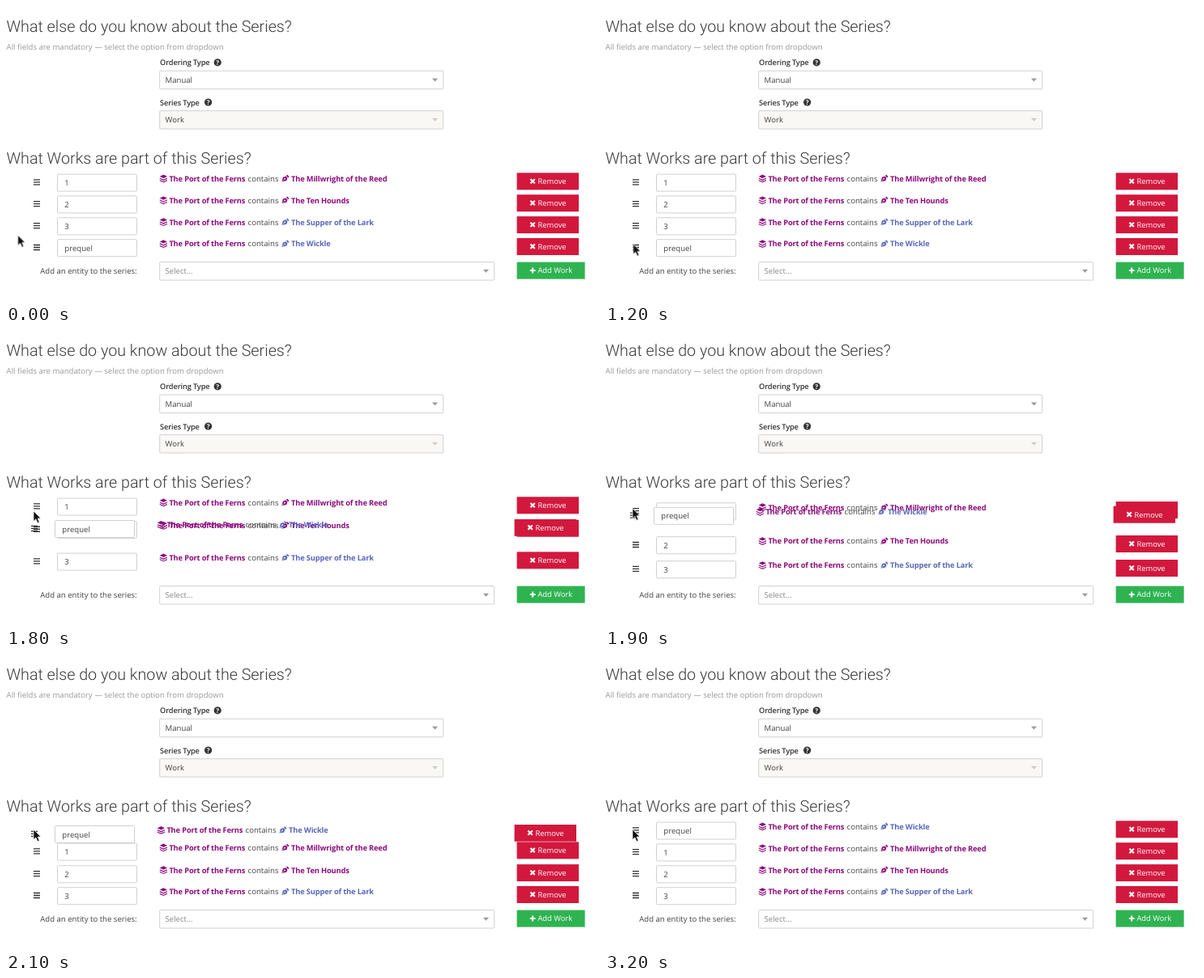
An HTML page for the animation above (3.5 s loop, 732 by 366 pixels).

```html
<!DOCTYPE html>
<html lang="en">
<head>
<meta charset="utf-8">
<title>Series editor</title>
<style>
html, body { margin: 0; width: 100%; height: 100%; overflow: hidden; background: #fff; }
svg { display: block; width: 732px; height: 366px; }
text { font: 9.6px "Open Sans", "Noto Sans", sans-serif; fill: #444; text-rendering: geometricPrecision; white-space: pre; }
.head { font: 300 19.72px Roboto, sans-serif; fill: #3a3a3a; }
.bold { font-weight: 700; font-size: 9.3px; letter-spacing: -.15px; }
.label { font-weight: 600; font-size: 9.3px; letter-spacing: -.16px; fill: #333; }
.btn { fill: #fff; font-size: 9.4px; }
.mark { fill: #fff; font-size: 8px; font-weight: 700; text-anchor: middle; }
</style>
</head>
<body>
<svg id="stage" viewBox="0 0 732 366"></svg>
<script>
const STEP = 100, LOOP = 3500, PITCH = 26.9;
const PURPLE = '#8d0a7c', BLUE = '#5a68b8', RED = '#d2183d', GREEN = '#2fb351';
const SERIES = 'The Port of the Ferns';
const stage = document.getElementById('stage');

function add(parent, tag, attrs, content) {
  const el = document.createElementNS('http://www.w3.org/2000/svg', tag);
  for (const k in attrs) el.setAttribute(k, attrs[k]);
  if (content) el.textContent = content;
  return parent.appendChild(el);
}
const text = (p, x, y, s, cls = '', fill) =>
  add(p, 'text', { x, y, class: cls, ...(fill && { style: 'fill:' + fill }) }, s);
const path = (p, x, y, d, attrs) =>
  add(p, 'path', { d, transform: `translate(${x} ${y})`, ...attrs });
const box = (p, x, y, width, height, fill = '#fff') =>
  add(p, 'rect', { x, y, width, height, fill, stroke: '#d0d0d0', rx: 1 });

function select(x, y, w, value, color, fill, caret) {
  box(stage, x, y, w, 22.4, fill);
  text(stage, x + 6.8, y + 14.3, value, '', color);
  path(stage, x + w - 13.7, y + 9.2, 'M0 0H7L3.5 4Z', { fill: caret });
}

function label(x, y, s, iconX) {
  text(stage, x, y, s, 'label');
  add(stage, 'circle', { cx: iconX, cy: y - 3.6, r: 4.6, fill: '#333' });
  text(stage, iconX, y - .6, '?', 'mark');
}

function button(p, x, y, w, fill, icon, s) {
  add(p, 'rect', { x, y, width: w, height: 21, fill });
  path(p, x + 16.2, y + 7, icon, { stroke: '#fff', 'stroke-width': 2.1, fill: 'none' });
  text(p, x + 25.8, y + 13.8, s, 'btn');
}

function layers(p, x, y) {
  path(p, x, y, 'M0 2.4 4.6 .2 9.2 2.4 4.6 4.6ZM0 4.1 4.6 6.2 9.2 4.1V5.4L4.6 7.6 0 5.4ZM0 6.7 4.6 8.8 9.2 6.7V7.9L4.6 10 0 7.9Z', { fill: PURPLE });
}

function pen(p, x, y, fill) {
  path(p, x, y, 'M0 9 1.5 3.5 5 2.3 7.1 4.4 5.9 7.7ZM5.6 1.7 6.8 .4 9.2 2.8 7.8 4Z', { fill });
  path(p, x, y, 'M.6 8.4 3.3 5.8', { stroke: '#fff', 'stroke-width': .6 });
  add(p, 'circle', { cx: x + 3.7, cy: y + 5.4, r: .9, fill: '#fff' });
}

// A row is drawn in the first slot and moved into place.
function makeRow(order, title, color) {
  const g = add(stage, 'g', {});
  path(g, 34, 217.8, 'M0-3H8M0 0H8M0 3H8', { stroke: '#333', 'stroke-width': 1.3 });
  box(g, 63.5, 208, 98, 21);
  text(g, 72.3, 222, order);
  layers(g, 189.8, 208.3);
  text(g, 201.4, 216.8, SERIES, 'bold', PURPLE);
  text(g, 298.6, 216.8, 'contains');
  pen(g, 340.4, 208.2, color);
  text(g, 352, 216.8, title, 'bold', color);
  button(g, 630.6, 206.3, 76.4, RED, 'M.6.6 6 6M6 .6.6 6', 'Remove');
  return g;
}

text(stage, .4, 31.6, 'What else do you know about the Series?', 'head');
text(stage, .6, 53.6, 'All fields are mandatory — select the option from dropdown', '', '#999');
label(190, 73.4, 'Ordering Type', 261.2);
select(189.7, 80.2, 350, 'Manual', '#444', '#fff', '#999');
label(190, 122.6, 'Series Type', 249.6);
select(189.7, 129.6, 350, 'Work', '#444', '#f9f8f5', '#ccc');
text(stage, .4, 194.8, 'What Works are part of this Series?', 'head');
text(stage, 42.2, 331.4, 'Add an entity to the series:');
select(189.7, 316.6, 413, 'Select...', '#888', '#fff', '#999');
button(stage, 630.6, 316.6, 84, GREEN, 'M3.3 0V6.8M0 3.4H6.8', 'Add Work');

const rows = [
  makeRow('1', 'The Millwright of the Reed', PURPLE),
  makeRow('2', 'The Ten Hounds', PURPLE),
  makeRow('3', 'The Supper of the Lark', BLUE)
];
const dragged = makeRow('prequel', 'The Wickle', BLUE);
const cursor = path(stage, 0, 0, 'M0 0V12.6L2.9 9.9 5 14.8 7.2 13.8 5.1 9.1H9Z',
  { fill: '#111', stroke: '#fff', 'stroke-width': .7 });

const MAKE_ROOM = 'cubic-bezier(.2,0,0,1)', FOLLOW = 'cubic-bezier(.2,.6,.3,1)';

// Points are [time, x, y, easing to the next point].
function motion(el, points) {
  const first = points[0], last = points[points.length - 1];
  const keys = [[0, first[1], first[2]], ...points, [LOOP, last[1], last[2]]];
  const anim = el.animate(keys.map(([t, x, y, easing = 'linear']) =>
    ({ offset: t / LOOP, transform: `translate(${x}px, ${y}px)`, easing })),
    { duration: LOOP, fill: 'both' });
  anim.pause();
  return anim;
}

// Each row gives way once the dragged row has passed it.
const passed = [1862, 1778, 1730];
const home = 3 * PITCH;
const motions = [
  ...rows.map((row, i) => motion(row, [
    [passed[i], 0, i * PITCH, MAKE_ROOM],
    [passed[i] + 330, 0, (i + 1) * PITCH]
  ])),
  motion(dragged, [
    [1500, 0, home, 'ease-in'],
    [1700, -3, home - 13.3, FOLLOW],
    [2100, -3, 4.5],
    [2400, 0, 0]
  ]),
  motion(cursor, [
    [700, 14.6, 283.4, 'ease-in-out'],
    [1300, 36, 295],
    [1500, 36, 295],
    [1700, 34, 228, 'ease-out'],
    [2100, 34, 217]
  ])
];

const start = performance.now();
function draw() {
  const elapsed = (performance.now() - start) % LOOP;
  const t = Math.floor(elapsed / STEP) * STEP;
  for (const m of motions) m.currentTime = t;
  requestAnimationFrame(draw);
}
draw();
</script>
</body>
</html>
```
